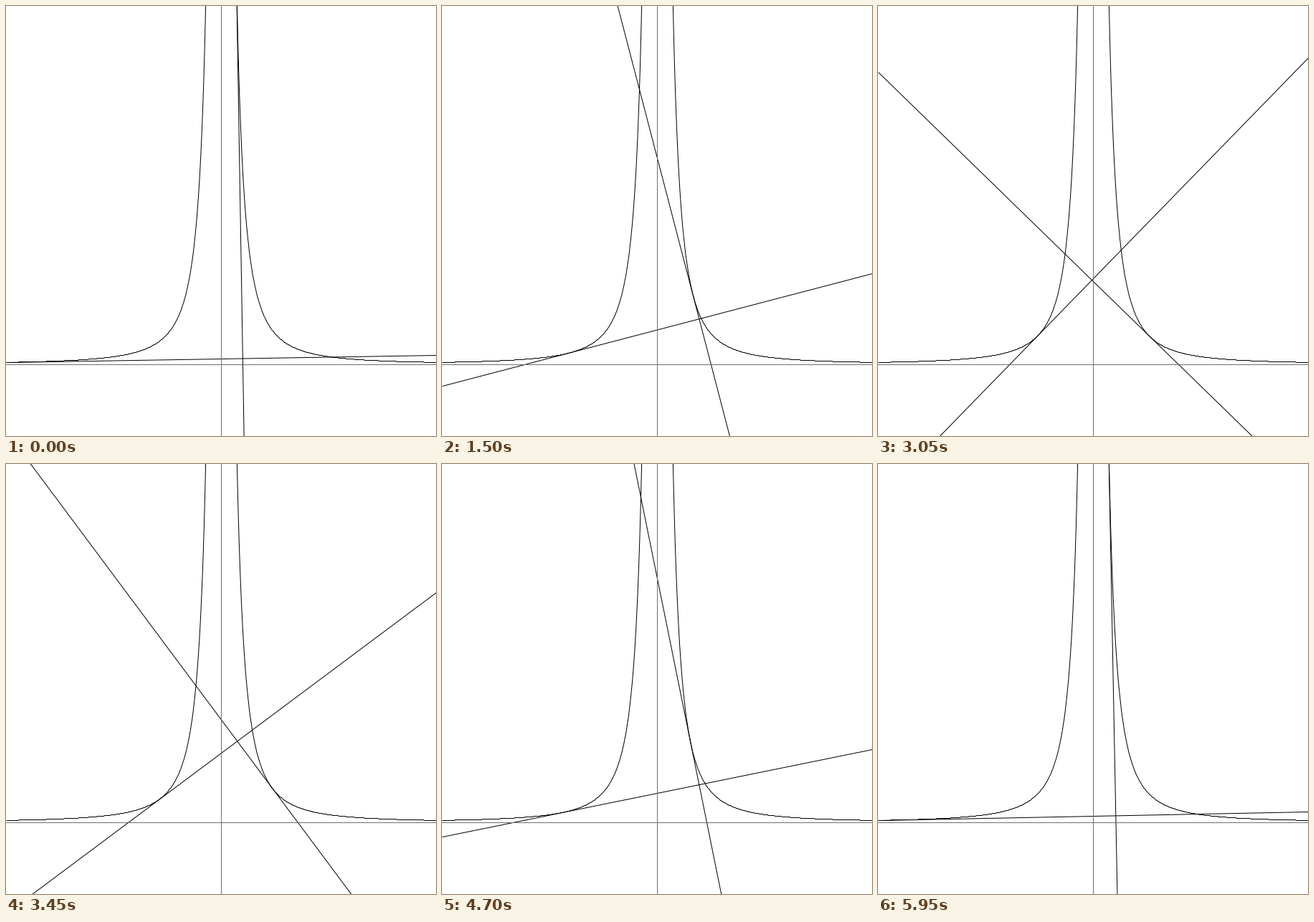
A matplotlib script that plays this animation: 600 px wide and 600 px high, repeating every 6 s.

```python
import numpy as np
import matplotlib.pyplot as plt
from matplotlib.animation import FuncAnimation

SIZE, FRAMES, STEP_MS, DPI = 600, 120, 50, 100
OX, OY = 300, 500            # origin in pixels
K = 240000                   # curve: h = K / x^2
DIAG = (2 * K) ** (1 / 3)    # distance where the slope is 1
PIXEL = 72 / DPI             # one pixel in points
GREY = "#6e6e6e"

plt.rcParams["path.simplify"] = False
fig = plt.figure(figsize=(SIZE / DPI, SIZE / DPI), dpi=DPI, facecolor="white")
ax = fig.add_axes([0, 0, 1, 1])
ax.axis("off")
# whole numbers fall on pixel centres
ax.set_xlim(-0.5, SIZE - 0.5)
ax.set_ylim(SIZE - 0.5, -0.5)


def stroke(x, y, color="black", z=2):
    return ax.plot(x, y, color=color, lw=PIXEL, zorder=z, snap=False,
                   solid_capstyle="butt", solid_joinstyle="round")[0]


def to_row(h):
    return np.floor(OY - h)


def tangent_rows(a):
    """Rows at both stage edges of the tangent at x = a."""
    slope = -2 * K / a ** 3
    return to_row(slope * (EDGES - OX - 1.5 * a))


EDGES = np.array([0, SIZE])

# one vertex per column, on whole pixels
right = np.arange(15, SIZE - OX + 1)
rows = to_row(K / right ** 2)
stroke(OX + right, rows)
stroke(OX - right, rows)

stroke([-1, SIZE], [OY, OY], GREY, 3)
stroke([OX, OX], [-1, SIZE], GREY, 3)

steep = stroke(EDGES, EDGES)
shallow = stroke(EDGES, EDGES)


def update(i):
    a = 20 + min(i, FRAMES - i)
    steep.set_ydata(tangent_rows(a))
    shallow.set_ydata(tangent_rows(-DIAG ** 2 / a))    # perpendicular
    return steep, shallow


anim = FuncAnimation(fig, update, frames=FRAMES, interval=STEP_MS,
                     repeat=True, repeat_delay=0, blit=False)
plt.show()
```
